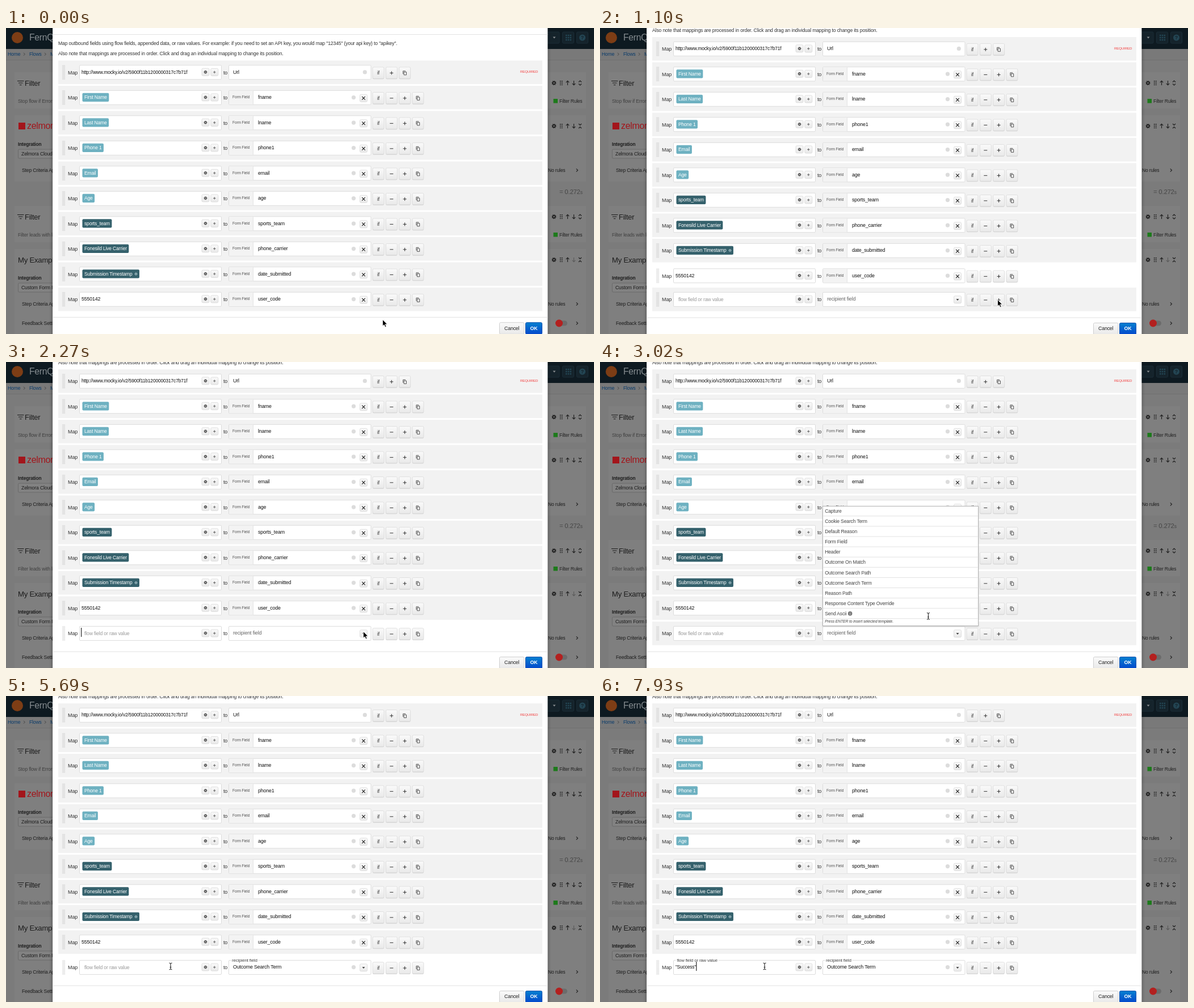
An HTML page that plays this animation: 1036 by 540 pixels, repeating every 8 s.

```html
<!DOCTYPE html>
<html lang="en">
<head>
<meta charset="utf-8">
<title>Field mapping dialog</title>
<style>
html, body { margin: 0; width: 100%; height: 100%; overflow: hidden; background: #7b7b7b; }
svg { display: block; width: 1036px; height: 540px; }
text { font-family: "Liberation Sans", Arial, sans-serif; letter-spacing: -.02em; white-space: pre; }
</style>
</head>
<body>
<svg id="stage" viewBox="0 0 1036 540" xmlns="http://www.w3.org/2000/svg"></svg>
<script>
const LOOP = 8000, PITCH = 44.5, TOP = 57.5, MID = 20.75, FRESH_Y = 458.2;
const stage = document.getElementById('stage');
const $ = id => document.getElementById(id);

// Markup helpers
const text = (x, y, s, size, fill = '#222', more = '') =>
  `<text x="${x}" y="${y}" font-size="${size}" fill="${fill}" ${more}>${s}</text>`;
const rect = (x, y, w, h, fill, more = '') =>
  `<rect x="${x}" y="${y}" width="${w}" height="${h}" fill="${fill}" ${more}/>`;
const line = (d, color, width = 1, more = '') =>
  `<path d="${d}" fill="none" stroke="${color}" stroke-width="${width}" ${more}/>`;
const at = (x, y, inner, more = '') => `<g transform="translate(${x} ${y})" ${more}>${inner}</g>`;
const dot = (x, y, r, fill) => `<circle cx="${x}" cy="${y}" r="${r}" fill="${fill}"/>`;

// Icons are centred on their own origin
const gear = (color, k = 1) => `<g transform="scale(${k})" fill="none" stroke="${color}">
  <circle r="1.9" stroke-width="1.5"/><circle r="3" stroke-width="1" stroke-dasharray="1.178"/></g>`;
const plus = (r, color, w = 1) => line(`M${-r} 0H${r}M0 ${-r}V${r}`, color, w);
const cross = r => line(`M${-r} ${-r}L${r} ${r}M${r} ${-r}L${-r} ${r}`, '#222', 1.15);
const minus = line('M-3 0H3', '#333', 1);
const copy = line('M-1.5 -1.7H2.8V3.5H-1.5ZM-3 1.8V-3.5H1.4', '#444', .9);
const caretDown = '<path d="M-2.5 -1H2.5L0 1.6Z" fill="#333"/>';
const ifWord = text(0, 3, 'if', 8.6, '#333', 'text-anchor="middle"');

const smallButton = (x, y, icon) => at(x, y,
  rect(-6.5, -6.5, 13, 13, 'url(#btn)', 'rx="2" stroke="#d8d8d8" stroke-width=".8"') + icon);
const button = (x, icon) => at(x, MID + 1.1,
  rect(-10, -9.6, 20, 20.6, '#cfcfcf', 'rx="2"') +
  rect(-10, -10.3, 20, 20.3, 'url(#btn)', 'rx="2" stroke="#dadada" stroke-width=".8"') + icon);
const box = (x, w) => rect(x, MID - 12.5, w, 25, '#fff', 'rx="1.5" stroke="#dcdcdc"');

const rows = [
  { value: 'http://www.mocky.io/v2/5900f11b1200000317c7b71f', size: 8.45, field: 'Url', required: true },
  { tag: 'First Name', field: 'fname' },
  { tag: 'Last Name', field: 'lname' },
  { tag: 'Phone 1', field: 'phone1' },
  { tag: 'Email', field: 'email' },
  { tag: 'Age', field: 'age' },
  { tag: 'sports_team', dark: true, field: 'sports_team' },
  { tag: 'Fonesild Live Carrier', dark: true, field: 'phone_carrier' },
  { tag: 'Submission Timestamp', dark: true, gear: true, field: 'date_submitted' },
  { value: '5550142', size: 8.9, field: 'user_code' },
  { fresh: true }
];

function tagMarkup(r) {
  return `<g class="tag" data-extra="${r.gear ? 9 : 0}">` +
    rect(134.5, MID - 8, 40, 15.2, r.dark ? '#35616c' : '#6eb1c1', 'rx="2"') +
    text(138, MID + 2.5, r.tag, 8.5, '#fff') +
    (r.gear ? at(229, MID - .2, gear('#a9c3c9', .75)) : '') + '</g>';
}

function rightField(r) {
  if (r.fresh) return `<g id="chosen" visibility="hidden">${text(400, MID + 1.9, 'Outcome Search Term', 8.9, '#111')}
    ${dot(612.5, MID - .4, 3.6, '#dcdcdc')}</g>` + smallButton(630, MID + .4, caretDown);
  if (r.required) return text(400, MID + 2.6, r.field, 8.9, '#111') + dot(632.3, MID - .3, 3.6, '#dcdcdc') +
    text(906, MID + 1, 'REQUIRED', 6.1, '#f23c3c');
  return rect(393, MID - 12, 42.5, 24, '#f3f3f3') + line(`M435.5 ${MID - 12}V${MID + 12}`, '#e2e2e2') +
    text(399, MID + 1.6, 'Form Field', 6.6, '#555') + text(444, MID + 2.4, r.field, 8.9, '#111') +
    dot(612.5, MID - .2, 3.6, '#dcdcdc') + smallButton(630, MID + 1, cross(2.8));
}

function rowMarkup(r, i) {
  const icons = r.required ? [ifWord, plus(3, '#333', 1), copy] : [ifWord, minus, plus(3, '#333', 1), copy];
  const grip = [99.8, 101.6, 103.4].map(x => `M${x} ${MID - 12.5}V${MID + 12.5}`).join('');
  return `<g id="row${i}">` + rect(92, 0, 853, 41.5, '#f2f2f2', `id="bg${i}"`) +
    line(grip, '#b9b9b9', .9, 'stroke-dasharray="1 1"') +
    text(109, MID + 3.5, 'Map', 9.1, '#333') + box(129.5, 250) +
    (r.tag ? tagMarkup(r) : '') + (r.value ? text(133, MID + 2.5, r.value, r.size, '#111') : '') +
    smallButton(351.5, MID - .5, gear('#333', .85)) + smallButton(367.3, MID - .3, plus(2.2, '#555', .9)) +
    text(383, MID + 3.4, 'to', 9, '#333') + box(392.5, 250.5) + rightField(r) +
    icons.map((icon, k) => button(656 + 23.3 * k, icon)).join('') + '</g>';
}

const ITEM = 18.1;
function menu(id, x, y, w, items, match) {
  const h = items.length * ITEM + 12;
  const mark = s => match ? s.replace(new RegExp(match, 'i'), '<tspan font-weight="bold" fill="#222">$&</tspan>') : s;
  return `<g id="${id}" visibility="hidden">` +
    rect(x, y, w, h, '#fff', 'stroke="#b4b4b4" filter="url(#soft)"') +
    items.map((s, i) => {
      const mid = y + 8.6 + i * ITEM;
      return text(x + 3.7, mid + 2.8, mark(s), 8.6, '#444', 'class="item"') +
        line(`M${x + 1} ${mid + 8.7}H${x + w - 1}`, '#e2e2e2');
    }).join('') +
    text(x + 3.7, y + h - 5.8, 'Press ENTER to insert selected template.', 6.85, '#444', 'font-style="italic"') +
    `<g class="info">${dot(0, 0, 3.8, '#7b7b7b')}${line('M0 -2V-1.2M0 -.4V2', '#ddd', .9)}</g></g>`;
}

const recipients = ['Capture', 'Cookie Search Term', 'Default Reason', 'Form Field', 'Header', 'Outcome On Match',
  'Outcome Search Path', 'Outcome Search Term', 'Reason Path', 'Response Content Type Override', 'Send Ascii'];
const sources = ['Last Name', 'Source ID', 'First Name', 'Source Name', 'sports_team', 'Fonesild Live Risk',
  'Submission Timestamp', 'Fonesild Live Errors', 'Fonesild Live Reason', 'Fonesild Live Carrier', 'Fonesild Live Outcome'];

// The dimmed page behind the dialog
function page() {
  const ink = '#1d1d1d', grey = '#414141', key = '#15232b', keyIcon = '#234553';
  const tools = (y, open, last) => at(965.5, y, gear(ink, 1.15)) +
    line(`M976.7 ${y - 4}V${y + 4}M979.7 ${y - 4}V${y + 4}`, ink, 1.6, 'stroke-dasharray="1.7 1.5"') +
    line(`M989.5 ${y + 4}V${y - 3.6}M986.8 ${y - .8}L989.5 ${y - 3.8}L992.2 ${y - .8}`, ink, 1.1) +
    line(`M1000.5 ${y - 4}V${y + 3.6}M997.8 ${y + .8}L1000.5 ${y + 3.8}L1003.2 ${y + .8}`, last ? '#5a5a5a' : ink, 1.1) +
    line(open ? `M1009 ${y - 1.5}L1011.5 ${y - 4}L1014 ${y - 1.5}M1009 ${y + 1.5}L1011.5 ${y + 4}L1014 ${y + 1.5}`
      : `M1009 ${y - 4}L1011.5 ${y - 1.5}L1014 ${y - 4}M1009 ${y + 4}L1011.5 ${y + 1.5}L1014 ${y + 4}`, ink, 1.1);
  const filter = (y, note) => line(`M20 ${y - 3.5}H31.5M22 ${y}H29.5M24 ${y + 3.5}H27.5`, ink, 1.2) +
    text(33, y + 4.5, 'Filter', 13, ink) + text(21, y + 35, note, 8.6, grey) + tools(y, true) +
    rect(964.5, y + 28, 7.5, 7.5, '#1d7a1b') + text(975, y + 35, 'Filter Rules', 8.4, '#222');
  const chevron = y => line(`M1004.8 ${y - 2.7}L1007.5 ${y}L1004.8 ${y + 2.7}`, '#222', 1.1);
  const integration = (y, name) => text(21, y + 3, 'Integration', 8.4, ink, 'font-weight="bold"') +
    rect(21.5, y + 9, 120, 16, '#828282', 'rx="2" stroke="#6a6a6a"') + text(27, y + 20, name, 8.7, ink) +
    text(28, y + 49, 'Step Criteria Applied', 8.6, ink) + text(955, y + 49, 'No rules', 8.5, ink) + chevron(y + 46);
  const headerKey = (x, w) => rect(x, 7, w, 20, key, 'rx="2" stroke="#1b2d37"');
  const crumb = (x, s) => text(x, 49, s, 8.6, '#0b3c6b');
  const step = x => line(`M${x} 43.8L${x + 2.3} 46.2L${x} 48.6`, '#444', 1);
  const cards = [[78, 64], [154, 117], [314, 64], [390, 160]];
  return rect(0, 0, 1036, 540, '#7b7b7b') +
    cards.map(([y, h]) => rect(15, y, 1007, h, '#7f7f7f')).join('') +
    rect(0, 0, 1036, 37, '#0e1a21') + rect(0, 37, 1036, 19, '#797979') + line('M0 56.5H1036', '#707070') +
    dot(20, 17, 10, '#7d3d15') + text(41, 22, 'FernQuay', 15.8, '#858c90') +
    crumb(3, 'Home') + step(31) + crumb(41, 'Flows') + step(68) + crumb(78, 'Mail') +
    headerKey(940, 35) + '<path d="M963.5 15.5h5l-2.5 3z" fill="#8a8f92"/>' +
    headerKey(980.5, 20) + line('M986 13H996M986 17H996M986 21H996', keyIcon, 2.5, 'stroke-dasharray="2.5 1.25"') +
    headerKey(1005.5, 20) + dot(1015.5, 17, 5.5, keyIcon) +
    text(1015.5, 20.2, '?', 9, key, 'text-anchor="middle" font-weight="bold"') +
    filter(97, 'Stop flow if Errors occur') + filter(333, 'Filter leads with logic') +
    rect(22, 167, 12, 12, '#a3151b') + text(37, 178, 'zelmora', 16, '#a3151b') + tools(173) +
    integration(205, 'Zelmora Cloud') +
    text(975, 293, '= 0.272<tspan font-size="8.5">s</tspan>', 11.4, '#474747') +
    text(21, 413.5, 'My Example', 13.2, ink) + tools(409, false, true) + integration(441, 'Custom Form Post') +
    text(28, 524, 'Feedback Settings', 8.6, ink) +
    rect(970, 516.5, 19, 9, '#6c6c6c', 'rx="4.5"') + dot(974.5, 521, 6.5, '#b3201f') + chevron(521);
}

const noteA = 'Map outbound fields using flow fields, appended data, or raw values. For example: if you need to set an API key, you would map "12345" (your api key) to "apikey".';
const noteB = 'Also note that mappings are processed in order. Click and drag an individual mapping to change its position.';
const gradient = (id, a, b) => `<linearGradient id="${id}" x2="0" y2="1"><stop stop-color="${a}"/><stop offset="1" stop-color="${b}"/></linearGradient>`;

stage.innerHTML = `<defs>${gradient('btn', '#fafafa', '#e9e9e9')}${gradient('blue', '#0480d0', '#0448cc')}
  <filter id="soft"><feDropShadow dx="0" dy="1" stdDeviation="1.2" flood-opacity=".2"/></filter>
  <filter id="deep"><feDropShadow dx="0" dy="2" stdDeviation="3" flood-opacity=".45"/></filter></defs>` +
  page() + rect(82.2, -40, 872.1, 640, '#fff', 'filter="url(#deep)"') +
  '<g id="scroll">' + line('M82.2 11.5H954.3', '#e3e3e3') + text(92, 30.2, noteA, 8.7, '#333') + text(92, 48.2, noteB, 8.7, '#333') +
  rows.slice(0, 10).map((r, i) => at(0, TOP + PITCH * i, rowMarkup(r, i))).join('') + '</g>' +
  `<g id="fresh">${at(0, FRESH_Y, rowMarkup(rows[10], 10))}
    <text id="flowLabel" stroke="#fff" paint-order="stroke">flow field or raw value</text>
    <text id="toLabel" stroke="#fff" paint-order="stroke">recipient field</text>
    ${text(133, 481.4, '', 8.4, '#111', 'id="typed"')}
    ${rect(0, 469, 1.1, 16, '#111', 'id="flowCaret"')}${rect(400.4, 470, 1.1, 14, '#111', 'id="toCaret"')}</g>` +
  '<g id="footer">' + line('M82.2 510.5H954.3', '#e3e3e3') +
  rect(869.5, 519.8, 43.5, 20.5, 'url(#btn)', 'rx="2" stroke="#cfcfcf"') + text(891.2, 532.8, 'Cancel', 8.8, '#222', 'text-anchor="middle"') +
  rect(915.5, 519.8, 29, 20.5, 'url(#blue)', 'rx="2" stroke="#0a4fae"') +
  text(930, 532.8, 'OK', 8.8, '#fff', 'text-anchor="middle" font-weight="bold"') + '</g>' +
  menu('toMenu', 392.5, 254.5, 274, recipients) +
  menu('flowMenu', 129.5, 254.5, 275, sources, 's') +
  menu('shortMenu', 129.5, 492.5, 275, ['Submission Timestamp', 'Submission Errors'], 'su') +
  '<path id="arrow" d="M0 0V11.6L2.7 9.2L4.6 13.4L6.6 12.5L4.8 8.4H8.4Z" fill="#000" stroke="#fff" stroke-width=".9"/>' +
  `<g id="beam">${['#fff', '#111'].map((c, i) =>
    line('M-2.5 -5.8Q0 -5.8 0 -4.4Q0 -5.8 2.5 -5.8M0 -4.6V4.6M-2.5 5.8Q0 5.8 0 4.4Q0 5.8 2.5 5.8M-1.3 1.6H1.3', c, i ? 1 : 2)).join('')}</g>`;

document.querySelectorAll('.tag').forEach(tag => {
  const width = tag.querySelector('text').getComputedTextLength();
  tag.querySelector('rect').setAttribute('width', width + 7 + Number(tag.dataset.extra));
});

// Motion
const show = (id, on) => $(id).setAttribute('visibility', on ? 'visible' : 'hidden');
const move = (el, x, y) => el.setAttribute('transform', `translate(${x} ${y})`);
const within = (t, a, b) => t >= a && t < b;
const mix = (a, b, f) => a + (b - a) * f;
const ease = f => f * f * (3 - 2 * f);
const count = (t, a, b, n) => t < a ? 0 : Math.min(n, 1 + Math.floor((t - a) * (n - 1) / (b - a) + .06));

// start, end, steps, x, y
const moves = [[300, 650, 3, 700.5, 479.5], [1250, 1970, 6, 629.5, 475.5], [2720, 3760, 8, 468, 390], [4350, 4950, 5, 290, 477]];
function pointer(t) {
  let x = 663.5, y = 514.5;
  for (const [a, b, n, x2, y2] of moves) {
    const f = ease(count(t, a, b, n) / n);
    x = mix(x, x2, f);
    y = mix(y, y2, f);
  }
  return { x, y };
}

function label(id, f, from, to) {
  const el = $(id), [x, y, size] = from.map((v, i) => mix(v, to[i], f));
  el.setAttribute('x', x);
  el.setAttribute('y', y);
  el.setAttribute('font-size', size);
  el.setAttribute('stroke-width', f ? 4 : 0);
}

function info(id, index) {
  const group = $(id), icon = group.querySelector('.info'), item = group.querySelectorAll('.item')[index];
  icon.setAttribute('display', item ? 'inline' : 'none');
  if (item) move(icon, Number(item.getAttribute('x')) + item.getComputedTextLength() + 6, Number(item.getAttribute('y')) - 3);
}

function draw(t) {
  const { x, y } = pointer(t);
  const shift = t < 1100 ? 0 : t < 1250 ? 41.5 : PITCH;
  move($('scroll'), 0, -shift);
  move($('footer'), 0, t < 1100 ? 0 : .7);
  $('fresh').setAttribute('display', t < 1100 ? 'none' : 'inline');

  const listOpen = within(t, 2420, 4350), inList = listOpen && y < 465;
  const hovered = inList ? -1 : Math.floor((y - TOP + (t < 1250 ? 0 : PITCH)) / PITCH);
  rows.forEach((r, i) => $('bg' + i).setAttribute('fill', i === hovered ? '#fff' : '#f2f2f2'));

  show('toMenu', listOpen);
  info('toMenu', inList ? Math.floor((y - 254.5) / ITEM) : -1);
  show('chosen', t >= 4350);
  label('toLabel', t < 4350 ? 0 : t < 4500 ? .5 : 1, [400, 480.8, 9], [398, 468.8, 8]);
  $('toLabel').setAttribute('fill', t < 4350 ? '#666' : '#444');
  show('toCaret', within(t, 2420, 2870) || within(t, 3310, 3760) || within(t, 4210, 4350));

  const letters = count(t, 6590, 7480, 7);
  const typed = t < 6140 ? '' : '"' + 'Success'.slice(0, letters) + (t >= 7930 ? '"' : '');
  $('typed').textContent = typed;
  label('flowLabel', t < 6140 ? 0 : t < 6290 ? .5 : 1, [138, 481.8, 8.7], [135.5, 468.8, 7.8]);
  $('flowLabel').setAttribute('fill', t < 6140 ? '#999' : '#444');
  $('flowCaret').setAttribute('x', typed ? 133 + $('typed').getComputedTextLength() + .2 : 132.2);
  show('flowCaret', within(t, 1250, 1770) || within(t, 2270, 2420) || within(t, 5250, 5690) || t >= 6140);
  show('flowMenu', letters === 1);
  info('flowMenu', 0);
  show('shortMenu', letters === 2);
  info('shortMenu', -1);

  const beam = inList || (t >= 4350 && (y < 400 || (x < 345 && y > 465)));
  show('arrow', !beam);
  show('beam', beam);
  move($('arrow'), x, y);
  move($('beam'), x, y);
}

const start = performance.now();
function tick() {
  draw((performance.now() - start) % LOOP);
  requestAnimationFrame(tick);
}
tick();
</script>
</body>
</html>
```
